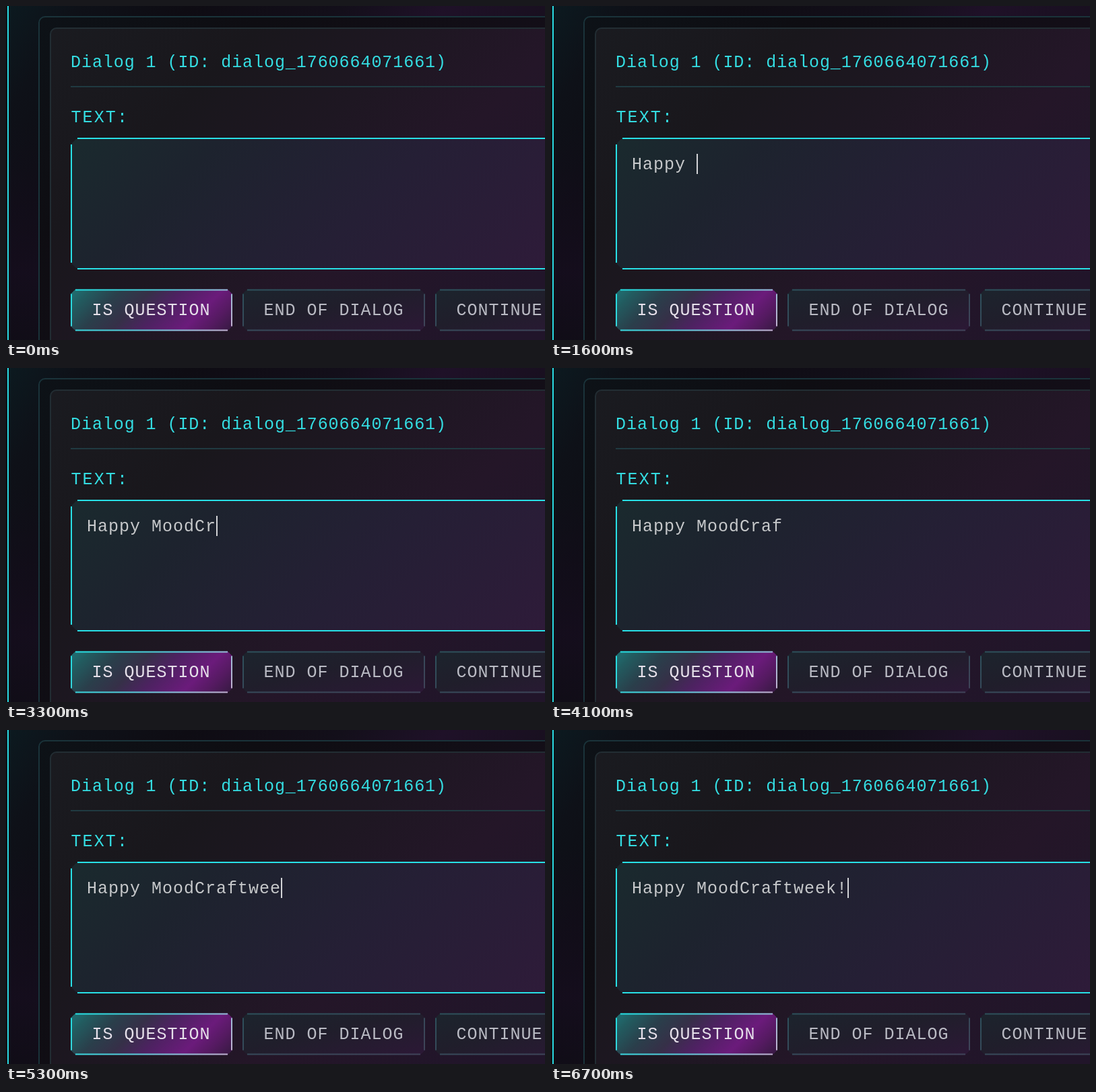
An HTML page for the animation above (6.8 s loop, 800 px wide and 497 px high).

```html
<!DOCTYPE html>
<html lang="en">
<head>
<meta charset="utf-8">
<title>Dialog editor</title>
<style>
  html, body { margin: 0; width: 100%; height: 100%; overflow: hidden; background: #0f0d14; }
  svg { display: block; width: 100%; height: 100%; }
  text { font: 25px "Liberation Mono", "Courier New", monospace; letter-spacing: 1px; white-space: pre; }
  .heading { fill: #34dde2; letter-spacing: .94px; }
  .label { fill: #34dde2; letter-spacing: 2.1px; }
</style>
</head>
<body>
<svg viewBox="0 0 800 497" preserveAspectRatio="none">
  <defs>
    <linearGradient id="page" gradientUnits="userSpaceOnUse" x1="0" y1="0" x2="620" y2="420">
      <stop offset="0" stop-color="#0c1a20"/>
      <stop offset=".12" stop-color="#0e1118"/>
      <stop offset=".3" stop-color="#0e0c13"/>
      <stop offset=".55" stop-color="#130f1a"/>
      <stop offset=".72" stop-color="#1f1128"/>
      <stop offset="1" stop-color="#150f1b"/>
    </linearGradient>
    <linearGradient id="glow" x1="0" y1="0" x2="0" y2="1">
      <stop offset=".35" stop-color="#160e20" stop-opacity="0"/>
      <stop offset=".8" stop-color="#170e20" stop-opacity=".7"/>
      <stop offset="1" stop-color="#110d18" stop-opacity=".7"/>
    </linearGradient>
    <linearGradient id="outer" gradientUnits="userSpaceOnUse" x1="48" y1="16" x2="598" y2="566">
      <stop offset="0" stop-color="#0d1217"/>
      <stop offset=".3" stop-color="#0e0d12"/>
      <stop offset="1" stop-color="#170f1c"/>
    </linearGradient>
    <linearGradient id="panel" gradientUnits="userSpaceOnUse" x1="66" y1="33" x2="616" y2="583">
      <stop offset="0" stop-color="#1a1b20"/>
      <stop offset=".28" stop-color="#19171c"/>
      <stop offset=".5" stop-color="#1e1722"/>
      <stop offset=".7" stop-color="#241628"/>
      <stop offset="1" stop-color="#21152a"/>
    </linearGradient>
    <linearGradient id="field" gradientUnits="userSpaceOnUse" x1="96" y1="196" x2="546" y2="646">
      <stop offset="0" stop-color="#1a2a2e"/>
      <stop offset=".25" stop-color="#1d232e"/>
      <stop offset=".6" stop-color="#251f35"/>
      <stop offset="1" stop-color="#2e1b39"/>
    </linearGradient>
    <linearGradient id="active" gradientUnits="userSpaceOnUse" x1="140.5" y1="377" x2="291.5" y2="528">
      <stop offset="0" stop-color="#1f7376"/>
      <stop offset=".1" stop-color="#225c60"/>
      <stop offset=".25" stop-color="#2a3f4b"/>
      <stop offset=".4" stop-color="#363048"/>
      <stop offset=".55" stop-color="#4d2261"/>
      <stop offset=".75" stop-color="#6b1b7b"/>
      <stop offset=".87" stop-color="#541a60"/>
      <stop offset="1" stop-color="#341a3f"/>
    </linearGradient>
    <linearGradient id="activeEdge" gradientUnits="userSpaceOnUse" x1="140.5" y1="377" x2="291.5" y2="528">
      <stop offset="0" stop-color="#22dce0"/>
      <stop offset=".5" stop-color="#55cdd8"/>
      <stop offset="1" stop-color="#c6b0d0"/>
    </linearGradient>
    <linearGradient id="idle" x1="0" y1="0" x2="1" y2="1">
      <stop offset="0" stop-color="#1c242d"/>
      <stop offset=".45" stop-color="#201e2b"/>
      <stop offset="1" stop-color="#2c1836"/>
    </linearGradient>
    <linearGradient id="idleEdge" x1="0" y1="0" x2="1" y2="1">
      <stop offset="0" stop-color="#2d505b"/>
      <stop offset="1" stop-color="#404358"/>
    </linearGradient>
  </defs>

  <rect width="800" height="497" fill="url(#page)"/>
  <rect width="50" height="497" fill="url(#glow)"/>
  <rect x="2" width="2" height="497" fill="#2adbe2"/>

  <rect x="49" y="16" width="800" height="540" rx="9" fill="url(#outer)" stroke="#1a333a" stroke-width="2"/>
  <rect x="66" y="33" width="800" height="540" rx="9" fill="url(#panel)" stroke="#222d33" stroke-width="2"/>
  <rect x="96" y="119" width="704" height="2" fill="#203a41"/>

  <text class="heading" x="96" y="91">Dialog 1 (ID: dialog_1760664071661)</text>
  <text class="label" x="96.5" y="173">TEXT:</text>

  <g id="boxes"></g>
  <text id="typed" x="120" y="243" fill="#c6c8ca"></text>
  <rect id="caret" y="220" width="2" height="30" fill="#d2d3d6"/>
</svg>
<script>
  const LOOP = 6800;
  const ADVANCE = 16;
  const MESSAGE = "Happy MoodCraftweek!";
  const typed = document.getElementById("typed");
  const caret = document.getElementById("caret");
  const boxes = document.getElementById("boxes");

  // Box with cut corners: the border stops short of each corner.
  function box(x, y, w, h, cut, fill, edge) {
    const r = x + w, b = y + h;
    const outline = `M${x + cut} ${y}H${r - cut}L${r} ${y + cut}V${b - cut}L${r - cut} ${b}H${x + cut}L${x} ${b - cut}V${y + cut}Z`;
    const border = `M${x + cut} ${y + 1}H${r - cut}M${x + cut} ${b - 1}H${r - cut}M${x + 1} ${y + cut}V${b - cut}M${r - 1} ${y + cut}V${b - cut}`;
    return `<path d="${outline}" fill="${fill}"/><path d="${border}" fill="none" stroke="${edge}" stroke-width="2"/>`;
  }

  function button(x, w, label, active) {
    const style = active ? "active" : "idle";
    return box(x, 421.5, w, 62, 7, `url(#${style})`, `url(#${style}Edge)`) +
      `<text x="${x + 31.5}" y="460" fill="${active ? "#e6e0ea" : "#babbc4"}">${label}</text>`;
  }

  boxes.innerHTML =
    box(96, 196, 760, 196, 10, "url(#field)", "#28e0e6") +
    button(96, 240, "IS QUESTION", true) +
    button(351, 271, "END OF DIALOG", false) +
    button(637, 240, "CONTINUE", false);

  function draw(time) {
    const t = Math.floor((time % LOOP) / 100) * 100;
    const count = Math.min(MESSAGE.length, Math.floor(t / 290 + 0.65));
    const phase = t % 1000;
    typed.textContent = MESSAGE.slice(0, count);
    caret.setAttribute("x", 120 + count * ADVANCE);
    caret.setAttribute("visibility", phase >= 300 && phase < 800 ? "visible" : "hidden");
  }

  const start = performance.now();
  function tick() {
    draw(performance.now() - start);
    requestAnimationFrame(tick);
  }
  tick();
</script>
</body>
</html>
```
